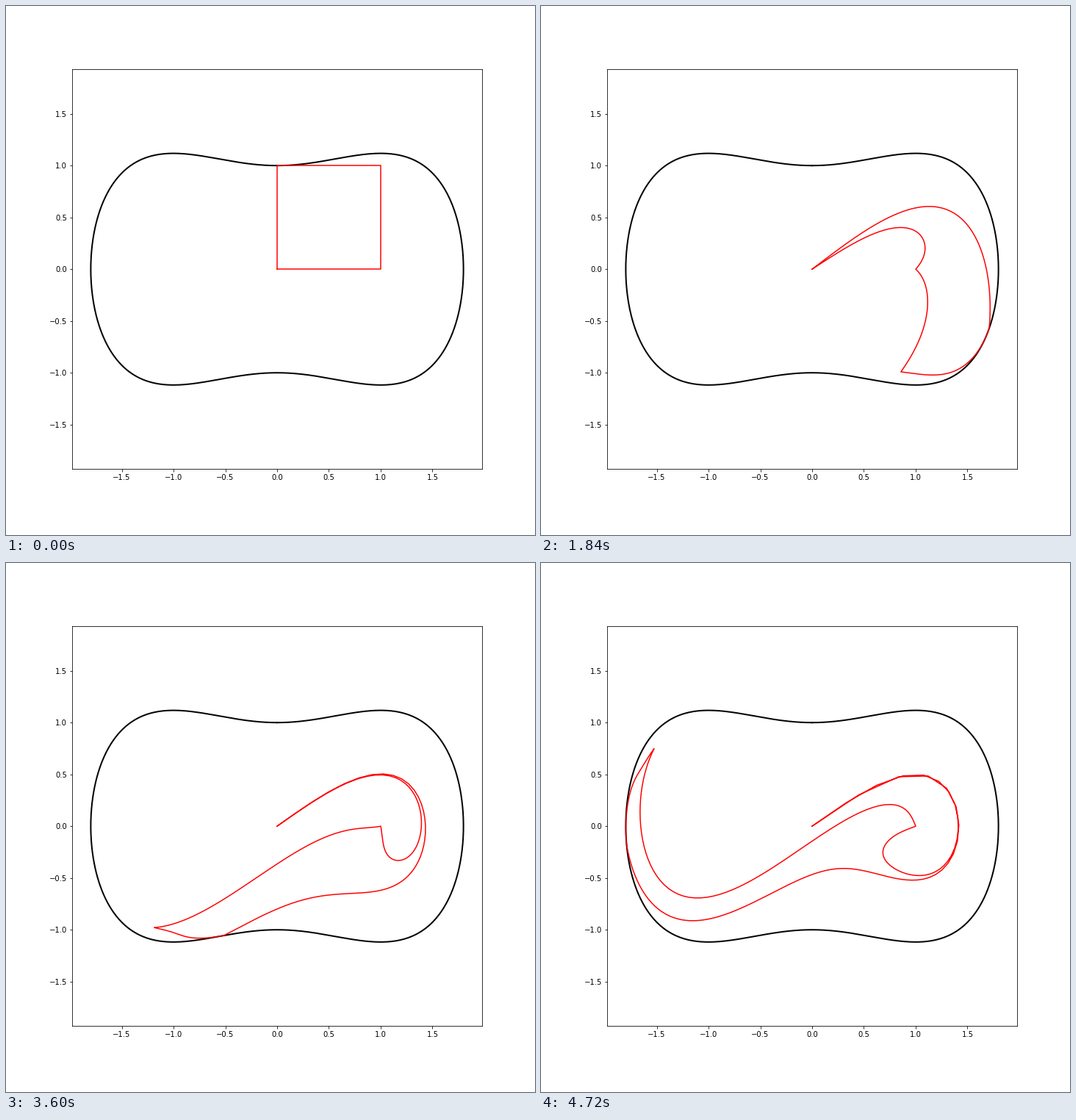
These frames come from a looping animation (720x720 px, 4.8 s). A matplotlib script:

```python
import numpy as np
import matplotlib.pyplot as plt
from matplotlib.animation import FuncAnimation

FRAMES = 60
INTERVAL = 80      # ms per frame
DT = 0.05          # model time per frame
SUBSTEPS = 5
EDGE_POINTS = 100


def flow(s):
    """Hamiltonian flow of H = p^2 + (q^2 - 1)^2 / 4."""
    q, p = s
    return np.array([2 * p, -q * (q * q - 1)])


def rk4(s, h):
    k1 = flow(s)
    k2 = flow(s + h / 2 * k1)
    k3 = flow(s + h / 2 * k2)
    k4 = flow(s + h * k3)
    return s + h / 6 * (k1 + 2 * k2 + 2 * k3 + k4)


def unit_square():
    u = np.linspace(0, 1, EDGE_POINTS)
    zero, one = np.zeros_like(u), np.ones_like(u)
    q = np.concatenate([u, one, u[::-1], zero])
    p = np.concatenate([zero, u, one, u[::-1]])
    return np.array([q, p])


def evolve(state):
    states = [state]
    for _ in range(FRAMES - 1):
        for _ in range(SUBSTEPS):
            state = rk4(state, DT / SUBSTEPS)
        states.append(state)
    return states


def outer_orbit():
    """Energy level through (0, 1), parametrised by an angle."""
    a = np.linspace(0, 2 * np.pi, 1201)
    q_max = np.sqrt(1 + np.sqrt(5))
    q = q_max * np.sin(a)
    p = q_max * np.cos(a) * np.sqrt(q * q + np.sqrt(5) - 1) / 2
    return q, p


fig, ax = plt.subplots(figsize=(10, 10), dpi=72)
fig.subplots_adjust(left=0.125, right=0.9, bottom=0.125, top=0.88)

orbit_q, orbit_p = outer_orbit()
ax.plot(orbit_q, orbit_p, color="black", lw=2)
x_lim = 1.1 * orbit_q.max()
y_lim = x_lim * 0.755 / 0.775
ax.set_xlim(-x_lim, x_lim)
ax.set_ylim(-y_lim, y_lim)

states = evolve(unit_square())
region, = ax.plot(*states[0], color="red", lw=1.5)


def update(i):
    region.set_data(*states[i])
    return region,


anim = FuncAnimation(fig, update, frames=FRAMES, interval=INTERVAL,
                     repeat=True, repeat_delay=0)
plt.show()
```
